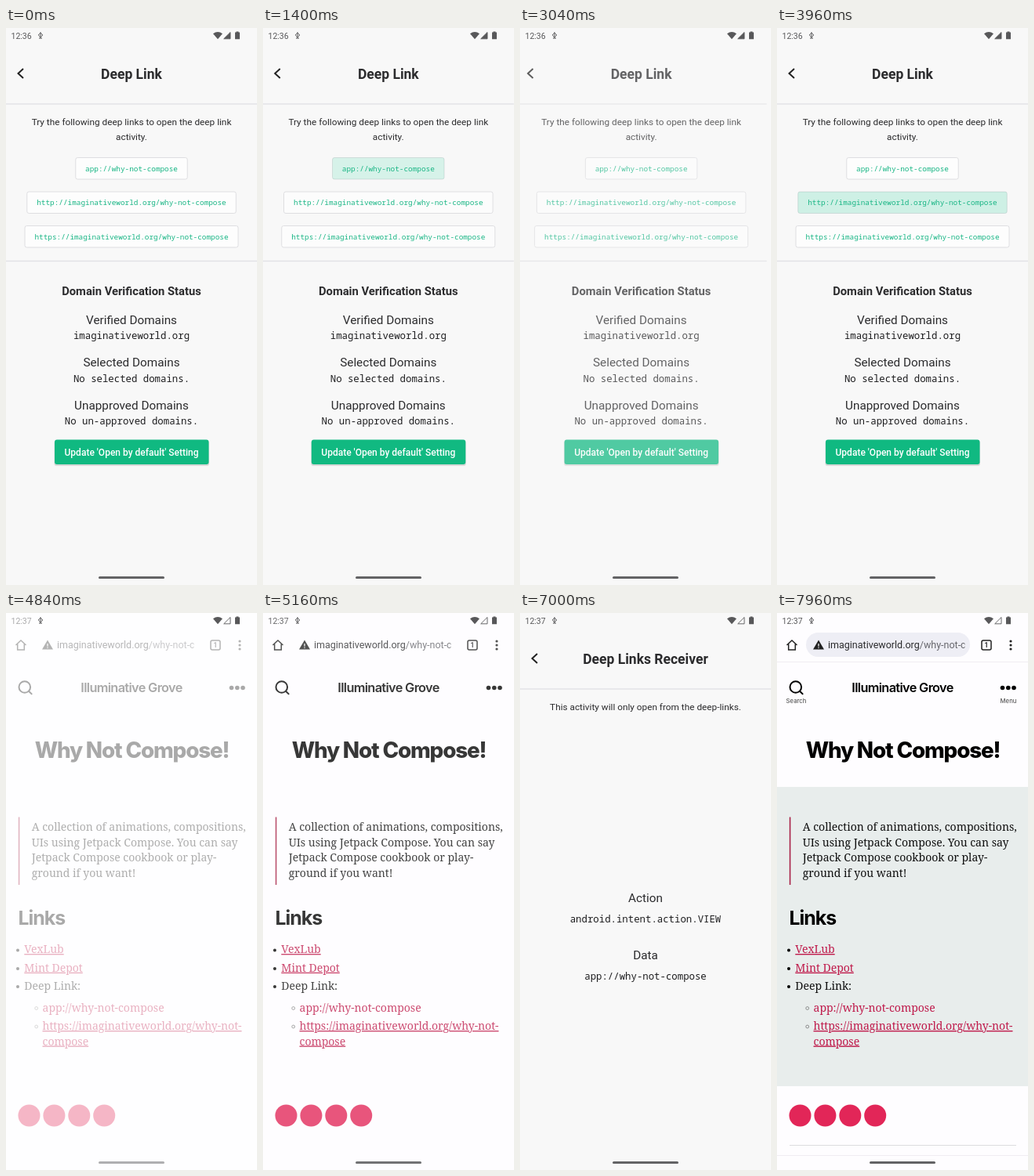
An HTML page for the animation above (8000 ms loop, 320 px wide and 711 px high).

```html
<!DOCTYPE html>
<html lang="en">
<head>
<meta charset="utf-8">
<title>Deep links</title>
<style>
  html, body { margin: 0; width: 100%; height: 100%; overflow: hidden; background: #f8f8f8; }
  svg { display: block; width: 100%; height: 100%; }
  text { font-family: Roboto, sans-serif; fill: #2b2b2d; white-space: pre; }
  .mid { text-anchor: middle; }
  .title { font-size: 17.5px; font-weight: 700; }
  .body { font-size: 11.8px; }
  .head { font-size: 15.3px; }
  .mono, .uri { font-family: "Noto Sans Mono", monospace; font-size: 12.35px; font-weight: 500; fill: #1d1d1f; }
  .uri { font-size: 9.37px; fill: #17b584; }
  .inter { font-family: Inter, sans-serif; fill: #000; }
  .h1 { font-size: 27.8px; font-weight: 800; letter-spacing: -.0416em; }
  .h2 { font-size: 24.9px; font-weight: 700; letter-spacing: -.04em; }
  .site { font-size: 16.3px; font-weight: 600; letter-spacing: -.04em; }
  .label { font-size: 7.7px; font-weight: 500; fill: #5a5a5a; }
  .serif, .link { font-family: "Noto Serif", serif; font-size: 14px; fill: #101010; }
  .link { fill: #bf1a4b; }
  .under { text-decoration: underline; text-decoration-thickness: 1px; }
</style>
</head>
<body>
<svg viewBox="0 0 320 711" preserveAspectRatio="none">
  <clipPath id="urlClip"><path d="M62 26h177.500v30H62z"/></clipPath>
  <rect width="320" height="711" fill="#f8f8f8"/>
  <g id="links"></g>
  <g id="receiver"></g>
  <rect id="blank" width="320" height="711" fill="#fff"/>
  <g id="browser"></g>
  <g fill="#58585a">
    <text id="clock" x="6.5" y="13.6" font-size="10.5" style="fill:#58585a"></text>
    <path d="M44 5.200v8M41.200 9l2.800-2.800L46.800 9 44 11.800zM42 13h4" fill="none" stroke="#58585a"/>
    <path d="M264 7.200q6-4.400 12 0l-6 7.100z"/>
    <path id="signal" d="M286 5.500v8.300h-8.300z" stroke="#58585a" stroke-width=".9"/>
    <path d="M293.500 5.500v-1h3v1h1.500v8.700h-6v-8.700z"/>
  </g>
  <rect id="handle" x="118" y="700" width="84" height="3" rx="1.500" fill="#636365"/>
  <circle id="touch" r="9.500" fill="#fff" fill-opacity=".5" stroke="#aaa" stroke-opacity=".55"/>
</svg>
<script>
const $ = id => document.getElementById(id);
const text = (cls, x, y, s) => `<text class="${cls}" x="${x}" y="${y}">${s}</text>`;
const mid = (cls, y, s, x = 160) => text(cls + ' mid', x, y, s);
const rule = y => `<rect y="${y}" width="320" height="1.4" fill="#e1e1e5"/>`;
const header = title => `
  <path d="M22 52l-6.500 6 6.500 6" fill="none" stroke="#222" stroke-width="2"/>
  ${mid('title', 64.700, title)}${rule(96.300)}`;

const chip = (id, y, width, uri) => {
  const box = `x="${160 - width / 2}" y="${y}" width="${width}" height="27.500" rx="2.500"`;
  return `<clipPath id="${id}Clip"><rect ${box}/></clipPath>
    <rect ${box} fill="#fdfdfd" stroke="#dedee1"/>
    <circle id="${id}" cx="160" cy="${y + 14}" fill="#10b981" clip-path="url(#${id}Clip)"/>
    ${mid('uri', y + 17.300, uri)}`;
};

$('links').innerHTML = header('Deep Link') +
  mid('body', 123.700, 'Try the following deep links to open the deep link') +
  mid('body', 143, 'activity.') +
  chip('appRipple', 165.500, 142.500, 'app://why-not-compose') +
  chip('httpRipple', 209, 266.500, 'http://imaginativeworld.org/why-not-compose') +
  chip('httpsRipple', 252.500, 272, 'https://imaginativeworld.org/why-not-compose') +
  rule(296.800) +
  `<g font-size="14.750" font-weight="700">${mid('', 340.500, 'Domain Verification Status')}</g>` +
  [['Verified Domains', 'imaginativeworld.org'],
   ['Selected Domains', 'No selected domains.'],
   ['Unapproved Domains', 'No un-approved domains.']].map(([head, value], i) =>
    mid('head', 377.500 + i * 54.500, head) + mid('mono', 397 + i * 54.500, value)).join('') +
  `<rect x="61.500" y="527" width="197.500" height="32" rx="3" fill="#000" opacity=".13"/>
   <rect x="62" y="525.500" width="196.500" height="31.500" rx="3" fill="#10b981"/>
   <text class="mid" x="160" y="545.700" font-size="12" font-weight="500" style="fill:#fff">Update 'Open by default' Setting</text>`;

$('receiver').innerHTML = '<circle id="backRipple" cx="18.500" cy="57.500" fill="#000"/>' +
  header('Deep Links Receiver') +
  mid('body', 123.700, 'This activity will only open from the deep-links.') +
  mid('head', 368.700, 'Action') + mid('mono', 395, 'android.intent.action.VIEW') +
  mid('head', 442, 'Data') + mid('mono', 468, 'app://why-not-compose');

const dots = (points, r, attrs = '') =>
  points.map(([x, y]) => `<circle cx="${x}" cy="${y}" r="${r}" ${attrs}/>`).join('');

$('browser').innerHTML = `
  <rect width="320" height="711" fill="#fefdff"/>
  <g id="late">
    <rect x="37" y="25" width="209" height="31" rx="15.500" fill="#eeeef5"/>
    <rect y="222" width="320" height="382" fill="#e8edec"/>
    <path d="M16 679.500h289" stroke="#dcdcdf"/>
    <path d="M0 62.500h320M0 692.500h320" stroke="#f0edf2"/>
    ${mid('inter label', 114.800, 'Search', 24.500)}${mid('inter label', 114.800, 'Menu', 295)}
  </g>
  <path d="M12.500 41l6.500-6 6.500 6M14.700 39.500v7.500h8.600v-7.500" fill="none" stroke="#222" stroke-width="1.500"/>
  <path d="M53 34.500l7 12h-14z" fill="#222"/>
  <path d="M53 39v3.700m0 1v1.300" stroke="#fff" stroke-width="1.200"/>
  <g clip-path="url(#urlClip)"><text x="65" y="45.300" font-size="12.500">imaginativeworld.org<tspan fill="#66666c">/why-not-compose</tspan></text></g>
  <rect x="261" y="35" width="12" height="12" rx="2" fill="none" stroke="#222" stroke-width="1.500"/>
  <text class="mid" x="267" y="44" font-size="8.500" font-weight="700">1</text>
  ${dots([[298, 36], [298, 41], [298, 46]], 1.600, 'fill="#222"')}
  <g fill="none" stroke="#000" stroke-width="2"><circle cx="23.800" cy="94.500" r="7.300"/><path d="M29 99.700l4.200 4.200"/></g>
  ${dots([[287.500, 95.500], [294.800, 95.500], [302, 95.500]], 2.800)}
  ${mid('inter site', 100.500, 'Illuminative Grove')}
  ${mid('inter h1', 185, 'Why Not Compose!', 160.500)}
  <rect x="15.800" y="260.500" width="1.600" height="86.500" fill="#a92349"/>
  ${['A collection of animations, compositions,', 'UIs using Jetpack Compose. You can say',
     'Jetpack Compose cookbook or play-', 'ground if you want!']
    .map((s, i) => text('serif', 32.700, 278 + i * 19.500, s)).join('')}
  ${text('inter h2', 15.500, 398, 'Links')}
  ${dots([[15, 430.500], [15, 454], [15, 477]], 2)}
  ${dots([[38.700, 504.500], [38.700, 528]], 1.900, 'fill="none" stroke="#777" stroke-width=".8"')}
  ${text('link under', 23.300, 434, 'VexLub')}
  ${text('link under', 23.300, 457.700, 'Mint Depot')}
  ${text('serif', 23.300, 481, 'Deep Link:')}
  ${text('link', 46.500, 508.500, 'app://why-not-compose')}
  ${text('link under', 46.500, 532, 'https://imaginativeworld.org/why-not-')}
  ${text('link under', 46.500, 551.500, 'compose')}
  ${dots([0, 1, 2, 3].map(i => [29.500 + i * 31.900, 641.500]), 14, 'fill="#e22658"')}`;

const clamp = v => Math.max(0, Math.min(1, v));
const easeOut = p => 1 - (1 - p) ** 3;
const linear = p => p;

// Value at time t along [time, value] stops.
function track(t, stops, ease = linear) {
  let value = stops[0][1];
  for (let i = 1; i < stops.length; i++) {
    const [t0, v0] = stops[i - 1], [t1, v1] = stops[i];
    if (t >= t0) value = v0 + (v1 - v0) * ease(clamp((t - t0) / (t1 - t0)));
  }
  return value;
}

function show(id, opacity, x = 0) {
  $(id).setAttribute('opacity', opacity);
  $(id).setAttribute('transform', `translate(${x} 0)`);
}

function ripple(id, t, start, end, size, alpha) {
  const grow = clamp((t - start) / 240);
  $(id).setAttribute('r', size * easeOut(grow));
  $(id).setAttribute('opacity', alpha * clamp((t - start) / 75) * clamp((end - t) / 160));
}

const taps = [[1040, 160, 181], [2520, 23, 62], [3600, 160, 225], [6120, 125, 504], [7040, 23, 62]];

function draw(t) {
  show('links',
    track(t, [[1400, 1], [1530, 0], [2940, 0], [3080, 1], [4600, 1], [4720, 0]]),
    track(t, [[1400, 0], [1840, -32], [2880, -32], [3240, 0]], easeOut));
  show('receiver',
    track(t, [[1450, 0], [1590, 1], [2880, 1], [3000, 0], [6340, 0], [6480, 1], [7440, 1], [7580, 0]]),
    track(t, [[1400, 32], [1840, 0], [2880, 0], [3240, 32], [6280, 32], [6680, 0], [7440, 0], [7960, 32]], easeOut));
  show('blank', track(t, [[4600, 0], [4720, 1], [6280, 1], [6440, 0], [7480, 0], [7640, 1]]));
  show('browser', track(t, [[4600, 0], [5320, 1], [6280, 1], [6440, 0], [7480, 0], [7760, 1]]));
  show('late', track(t, [[5440, 0], [6040, 1]]));

  // The system bars dim while the browser window opens.
  const bars = track(t, [[4600, 1], [4720, .5], [4840, .5], [5240, 1]]);
  show('clock', bars);
  show('handle', bars);

  ripple('appRipple', t, 1040, 1530, 145, .2);
  ripple('httpRipple', t, 3600, 4160, 145, .2);
  const second = t > 5000;
  ripple('backRipple', t, second ? 7080 : 2540, second ? 7580 : 3000, 18.500, .1);

  const tap = taps.find(([start]) => t >= start && t < start + 100);
  $('touch').setAttribute('opacity', tap ? 1 : 0);
  if (tap) $('touch').setAttribute('transform', `translate(${tap[1]} ${tap[2]})`);

  const nextMinute = t >= 4840;
  $('clock').textContent = nextMinute ? '12:37' : '12:36';
  $('signal').setAttribute('fill', nextMinute ? 'none' : '#58585a');
}

const begin = performance.now();
function tick() {
  draw((performance.now() - begin) % 8000);
  requestAnimationFrame(tick);
}
tick();
</script>
</body>
</html>
```
